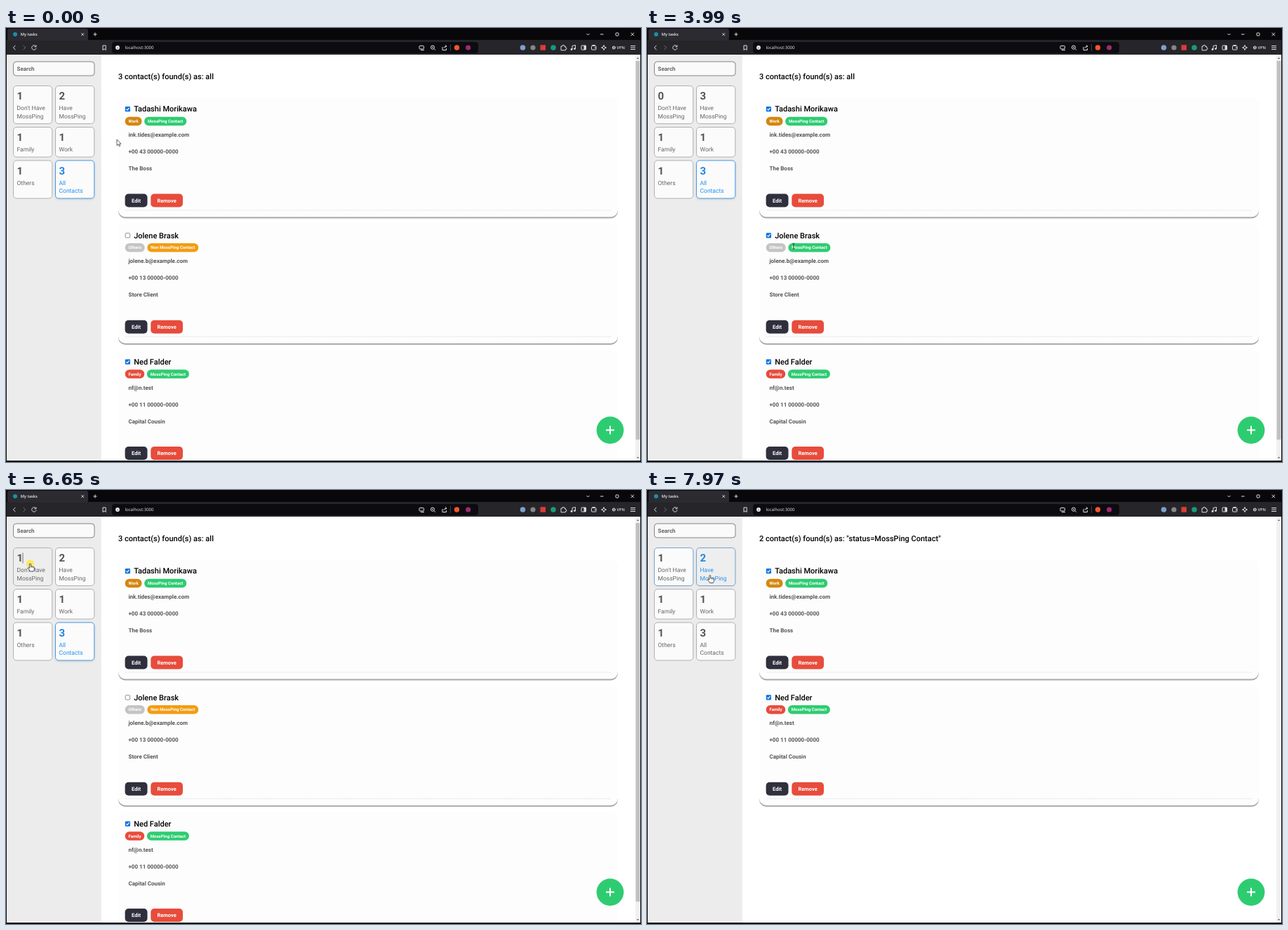
Write an HTML page that moves like this. It is 905 px wide and 619 px high and loops after 8 s.

```html
<!DOCTYPE html>
<html lang="en">
<head>
<meta charset="utf-8">
<title>My tasks</title>
<style>
  html, body { margin: 0; width: 100%; height: 100%; overflow: hidden; background: #000; }
  svg { display: block; width: 100vw; height: 100vh; }
  text { font-family: Roboto, "Liberation Sans", sans-serif; white-space: pre; text-rendering: geometricPrecision; }
  .ui { font-family: "Open Sans", sans-serif; }
  .card { filter: drop-shadow(0 2px .7px rgba(0, 0, 0, .34)); }
  .line { fill: none; stroke: #dededf; stroke-width: 1; }
</style>
</head>
<body>
<svg id="stage" viewBox="0 0 905 619" xmlns="http://www.w3.org/2000/svg"></svg>
<script>
const LOOP = 8000;
const BLUE = [30, 144, 255], GREY = [176, 176, 176];
const APP = 'MossPing';

const people = [
  { name: 'Tadashi Morikawa', mail: 'ink.tides@example.com', phone: '+00 43 00000-0000', note: 'The Boss', tag: 'Work' },
  { name: 'Jolene Brask', mail: 'jolene.b@example.com', phone: '+00 13 00000-0000', note: 'Store Client', tag: 'Others' },
  { name: 'Ned Falder', mail: 'nf@n.test', phone: '+00 11 00000-0000', note: 'Capital Cousin', tag: 'Family' }
];
const tags = {
  Work: { w: 23.8, color: '#d4870f' },
  Others: { w: 28, color: '#c4c4c4' },
  Family: { w: 27.5, color: '#e74c3c' }
};
const tiles = [
  { x: 10.5, y: 82.5, h: 54, lines: ["Don't Have", APP] },
  { x: 70.5, y: 82.5, h: 54, lines: ['Have', APP] },
  { x: 10.5, y: 141.5, h: 42.5, lines: ['Family'] },
  { x: 70.5, y: 141.5, h: 42.5, lines: ['Work'] },
  { x: 10.5, y: 189, h: 54, lines: ['Others'] },
  { x: 70.5, y: 189, h: 54, lines: ['All', 'Contacts'] }
];

// Active tile over time: [start, tile]
const selections = [[-1000, 5], [6710, 0], [7850, 1]];
// Hovered tile: [tile, enter, leave]
const hovers = [[1, 560, 1210], [0, 6380, 7480], [1, 7560, 9000]];
const clicks = [[2430, 2600], [5730, 5850], [6590, 6720], [7790, 7880]];
const nameCaret = [[110, 610], [1110, 1610]];
const tileCaret = [[6590, 7100], [7600, 7790]];
const checked = [2430, 5730];

// Pointer path: time, x, y, shape
const path = [
  [0, 158, 159, 'arrow'], [60, 158, 159, 'arrow'], [110, 158, 156, 'arrow'], [360, 158, 156, 'arrow'],
  [560, 124, 133, 'hand'], [800, 112, 122, 'hand'], [1150, 121, 131, 'hand'], [1210, 132, 152, 'arrow'],
  [1390, 158.5, 217, 'arrow'], [1650, 174, 280, 'arrow'], [1950, 181, 300, 'arrow'], [2070, 180, 300, 'arrow'],
  [2250, 171, 297, 'arrow'], [2850, 171, 297, 'arrow'], [2940, 205, 305, 'beam'], [3030, 235, 320, 'arrow'],
  [3450, 235, 320, 'arrow'], [3690, 209, 311, 'beam'], [3990, 209, 311, 'beam'], [4300, 196, 312, 'arrow'],
  [4770, 167, 292, 'arrow'], [4890, 167, 292, 'arrow'], [5190, 153, 262, 'arrow'], [5490, 169, 292, 'arrow'],
  [5670, 171, 293, 'arrow'], [5790, 171, 293, 'arrow'], [6050, 128, 160, 'arrow'], [6270, 68, 69, 'arrow'],
  [6380, 50, 85, 'hand'], [6530, 34.5, 105, 'hand'], [6700, 34.5, 105, 'hand'], [6950, 24.3, 113, 'hand'],
  [7130, 24.3, 113, 'hand'], [7480, 67, 115, 'arrow'], [7560, 76, 118, 'hand'], [7790, 89.7, 121.5, 'hand'],
  [8000, 89.7, 121.5, 'hand']
];

const text = (x, y, s, size, weight = 400, fill = '#000', anchor = 'start', cls = '') =>
  `<text x="${x}" y="${y}" font-size="${size}" font-weight="${weight}" fill="${fill}" text-anchor="${anchor}" class="${cls}">${s}</text>`;
const box = (x, y, w, h, fill, r = 0, extra = '') =>
  `<rect x="${x}" y="${y}" width="${w}" height="${h}" rx="${r}" fill="${fill}" ${extra}/>`;
const dot = (x, y, r, fill) => `<circle cx="${x}" cy="${y}" r="${r}" fill="${fill}"/>`;
const line = (d, extra = '') => `<path class="line" d="${d}" ${extra}/>`;
const ring = (x, y, r) => `<circle class="line" cx="${x}" cy="${y}" r="${r}"/>`;
const frame = (x, y, w, h) => box(x, y, w, h, 'none', .8, 'class="line"');

function browser() {
  return box(0, 0, 905, 619, '#08080a') + box(1, 17, 903, 21, '#25252a') + box(2, 1, 115, 17, '#2b2b31', 3) +
    box(151, 20, 522, 16, '#0c0c10', 4) + dot(13, 9, 3, '#1b8fa6') +
    text(20.7, 11.2, 'My tasks', 5.7, 600, '#eee', 'start', 'ui') +
    text(169.5, 30.2, 'localhost:3000', 6.1, 500, '#eee', 'start', 'ui') +
    line('M107.5 7.3l3.5 3.5m0-3.5l-3.5 3.5M124.5 9h5m-2.5-2.5v5') +
    line('M827.5 8l2 2 2-2M847 9h4.5M890.5 6.7l4.5 4.5m0-4.5l-4.5 4.5') + frame(869, 7, 4, 4) +
    line('M13.5 25l-3.2 3 3.2 3') + line('M24.5 25l3.2 3-3.2 3', 'opacity=".4"') +
    line('M42.5 26a3.2 3.2 0 1 0 .6 2.6M43 24.5v2.3h-2.5M138 25h4.2v6.5l-2.1-1.7-2.1 1.7z') +
    dot(159, 28, 2.9, '#eee') + box(158.6, 27.5, .8, 2, '#222') +
    frame(589, 25.5, 6.5, 4.4) + line('M591 31.5h5') + ring(608, 27.6, 2.6) + line('M610 29.6l2 2M606.8 27.6h2.4') +
    line('M622 27v4.5h5.5V29M624 28.5q.5-2.5 4-2.5m-1.7-1.7l1.7 1.7-1.7 1.7') + box(633, 23, .7, 10, '#55555c') +
    dot(642.5, 28, 3.7, '#f5562a') + dot(658.7, 28, 3.6, '#a02a70') +
    dot(736.5, 28, 3.8, '#7d9fce') + dot(751, 28, 3.6, '#85858a') + box(761.5, 24.2, 7.5, 7.5, '#dc3b35') + dot(780, 28, 3.8, '#179b77') +
    line('M791 26h2a1.3 1.3 0 1 1 2.5 0h1.8v2a1.3 1.3 0 1 1 0 2.5v1.3H791z') +
    line('M807 30.5v-5l4.5-1v5') + dot(806, 30.5, 1.4, '#ddd') + dot(810.5, 29.6, 1.4, '#ddd') +
    frame(820, 25, 6.5, 6) + box(823.5, 25, 3, 6, '#ddd') + frame(834.5, 25.5, 6.5, 5.5) + line('M838.5 28.2h2.5M835 25l4.5-.8') +
    line('M852 24.5l1 2.5 2.5 1-2.5 1-1 2.5-1-2.5-2.5-1 2.5-1z') + ring(866.3, 28, 2) + line('M864.3 28h4') +
    text(870.5, 30.1, 'VPN', 5.6, 600, '#ddd', 'start', 'ui') + line('M890 25.5h7m-7 2.5h7m-7 2.5h7');
}

function staticPage() {
  return browser() + box(1, 38, 903, 579, '#fff') + box(1, 38, 134.7, 579, '#ececec') +
    box(10.5, 48, 115.5, 20, '#fafafa', 4, 'stroke="#858585"') + text(15.5, 60.8, 'Search', 8, 600, '#666') +
    box(897, 38, 7, 579, '#f1f1f1') +
    '<path d="M898.8 44l1.7-2 1.7 2zM898.8 612l1.7 2 1.7-2z" fill="#666"/>';
}

function badge(x, y, w, color, label) {
  return box(x, y - 6.2, w, 12.4, color, 6) + text(x + w / 2, y + 2.2, label, 6.1, 700, '#fff', 'middle');
}

function button(x, w, color, label) {
  return box(x, 236.6, w, 18.8, color, 5) + text(x + w / 2, 248.5, label, 7.5, 700, '#fff', 'middle');
}

function contact(p, top, linked) {
  const tag = tags[p.tag], x2 = 169.7 + tag.w + 3.7;
  const tick = linked
    ? box(169.8, 112, 7.2, 7.2, '#0c72e0', 1) + line('M171.4 115.6l1.5 1.6 2.7-3.3', 'style="stroke:#fff;stroke-width:1.1"')
    : box(170.2, 112.4, 6.4, 6.4, '#fff', 1, 'stroke="#777" stroke-width=".8"');
  const details = [p.mail, p.phone, p.note].map((s, i) => text(174.5, 155 + i * 24.1, s, 8, 600, '#555')).join('');
  return `<g transform="translate(0 ${top})">` +
    box(160, 99, 712, 170.5, '#fdfdfd', 10, 'class="card"') + tick + text(182.2, 119.4, p.name, 11, 500) +
    badge(169.7, 133, tag.w, tag.color, p.tag) +
    (linked ? badge(x2, 133, 60, '#2ecc71', APP + ' Contact') : badge(x2, 133, 72.8, '#f39c12', `Non ${APP} Contact`)) +
    details + button(169.6, 31.9, '#2f2f3d', 'Edit') + button(206.3, 45.7, '#e74c3c', 'Remove') +
    line('M170 260h692', 'style="stroke:#e2e2e2" stroke-dasharray="2 1"') + '</g>';
}

function list(active, linked) {
  const shown = people.filter((p, i) => active === 5 || (i === 1) === (active === 0));
  const query = ['"status=Non ' + APP + ' Contact"', '"status=' + APP + ' Contact"'][active] || 'all';
  return (active === 5 ? box(897.5, 47, 6, 540, '#c1c1c1') : '') +
    text(160, 72.6, `${shown.length} contact(s) found(s) as: ${query}`, 11, 500) +
    shown.map((p, i) => contact(p, i * 180.25, p !== people[1] || linked)).join('');
}

function tileText(active, linked) {
  const counts = linked ? [0, 3, 1, 1, 1, 3] : [1, 2, 1, 1, 1, 3];
  return tiles.map((tile, i) => {
    const on = i === active, x = tile.x + 5;
    return text(x, tile.y + 19.7, counts[i], 15, 700, on ? '#1e88e5' : '#555') +
      tile.lines.map((s, k) => text(x, tile.y + 34.7 + k * 11.7, s, 8.5, 400, on ? '#2090f0' : '#666')).join('');
  }).join('');
}

const add = '<circle cx="861" cy="573.6" r="19.4" fill="#2ecc71"/><path d="M855 573.6h12m-6-6v12" stroke="#fff" stroke-width="2"/>';
const pointers = {
  arrow: '<path d="M0 0V8.6L2 6.8 3.3 9.8 4.7 9.2 3.5 6.2H6z" fill="#fff" stroke="#222" stroke-width=".7"/>',
  beam: '<path d="M-1.5-4q1.5 0 1.5 1v6q0 1 1.5 1M1.5-4Q0-4 0-3M0 3q0 1-1.5 1" fill="none" stroke="#222" stroke-width=".8"/>',
  hand: '<path d="M-1 1Q-1 0 0 0t1 1V4q1-.7 1.6.2 1.2-.5 1.7.4 1.4-.3 1.4.9V8q0 1.6-1 3H-.2Q-1 9-2.8 7.2q-.8-1.2.1-1.5.8-.2 1.7.9z" fill="#fff" stroke="#222" stroke-width=".75"/><path d="M1 4v2m1.7-1.6v1.7m1.6-1.2v1.3" stroke="#222" stroke-width=".5"/>'
};

const stage = document.getElementById('stage');
stage.innerHTML = '<clipPath id="page"><path d="M1 38h903v579H1z"/></clipPath>' + staticPage() +
  '<g id="list" clip-path="url(#page)"></g><g id="tiles"></g><g id="labels"></g>' +
  box(242.2, 241, .8, 10, '#fff', 0, 'id="nameCaret"') + box(23.6, 89.5, .8, 15, '#555', 0, 'id="tileCaret"') + add +
  '<circle id="halo" r="5.6" fill="#ffe928" opacity=".72"/><g id="pointer"></g>';
const el = id => document.getElementById(id);
el('tiles').innerHTML = tiles.map(t => box(t.x, t.y, 55.3, t.h, '#fafafa', 4.5)).join('');
const tileBoxes = [...el('tiles').children];

const clamp = v => Math.max(0, Math.min(1, v));
const mix = (a, b, k) => `rgb(${a.map((v, i) => Math.round(v + (b[i] - v) * k))})`;
const within = (spans, t) => spans.some(([a, b]) => t >= a && t < b);
const show = (id, on) => el(id).setAttribute('visibility', on ? 'visible' : 'hidden');

function activeLevel(tile, t) {
  const k = selections.findIndex(s => s[1] === tile);
  if (k < 0) return 0;
  const next = selections[k + 1];
  return clamp((t - selections[k][0]) / 240) * (next ? 1 - clamp((t - next[0]) / 240) : 1);
}

function hoverLevel(tile, t) {
  return Math.max(0, ...hovers.filter(h => h[0] === tile)
    .map(([, a, b]) => clamp((t - a) / 240) * (1 - clamp((t - b) / 300))));
}

function pointerAt(t) {
  const i = Math.max(0, path.findLastIndex(p => p[0] <= t));
  const a = path[i], b = path[i + 1] || a, k = b === a ? 0 : (t - a[0]) / (b[0] - a[0]);
  return { x: a[1] + (b[1] - a[1]) * k, y: a[2] + (b[2] - a[2]) * k, shape: a[3] };
}

let lastKey = '', lastShape = '';
function render(t) {
  const active = selections.findLast(s => s[0] <= t)[1], linked = within([checked], t);
  const key = active + ':' + linked;
  if (key !== lastKey) {
    el('list').innerHTML = list(active, linked);
    el('labels').innerHTML = tileText(active, linked);
    lastKey = key;
  }
  tileBoxes.forEach((rect, i) => {
    const on = activeLevel(i, t);
    rect.setAttribute('fill', mix([251, 251, 251], [238, 238, 238], hoverLevel(i, t)));
    rect.setAttribute('stroke', mix(GREY, BLUE, on * .75));
    rect.style.filter = on > 0 ? `drop-shadow(0 1.5px 1.5px rgba(0,0,0,${.13 * on}))` : 'none';
  });
  show('nameCaret', within(nameCaret, t));
  show('tileCaret', within(tileCaret, t));
  el('tileCaret').setAttribute('fill', active === 0 ? '#2090f0' : '#555');
  const p = pointerAt(t);
  if (p.shape !== lastShape) el('pointer').innerHTML = pointers[lastShape = p.shape];
  el('pointer').setAttribute('transform', `translate(${p.x} ${p.y})`);
  show('halo', within(clicks, t));
  el('halo').setAttribute('cx', p.x);
  el('halo').setAttribute('cy', p.y);
}

const start = performance.now();
function tick() {
  render((performance.now() - start) % LOOP);
  requestAnimationFrame(tick);
}
tick();
</script>
</body>
</html>
```
